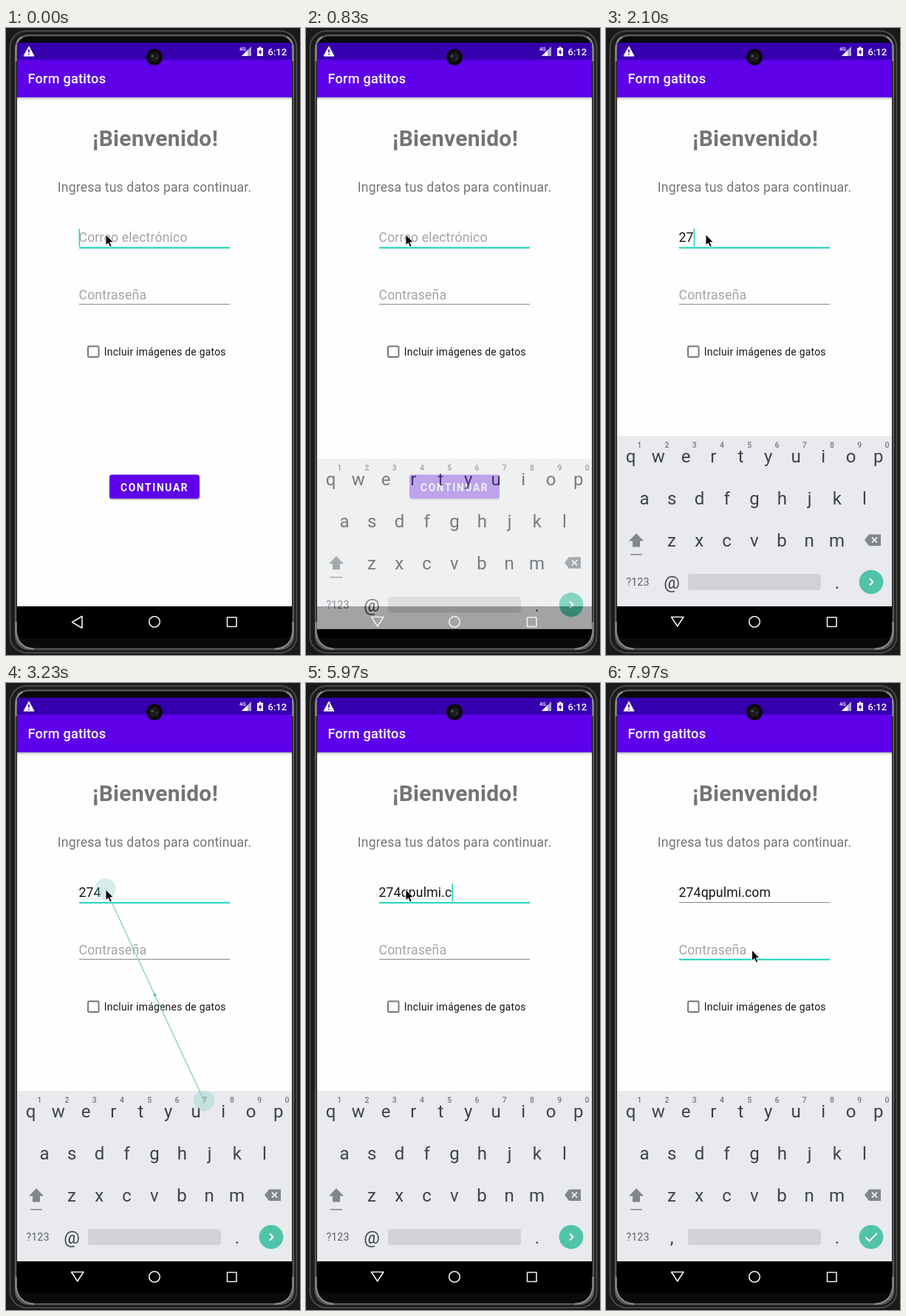
Recreate the animation shown at these times as an HTML page. Size 398 by 850 pixels, loop 8000 ms.

```html
<!DOCTYPE html>
<html lang="es">
<head>
<meta charset="utf-8">
<title>Form gatitos</title>
<style>
  html, body { margin: 0; width: 100%; height: 100%; overflow: hidden; background: #1a1a1a; }
  svg { display: block; width: 398px; height: 850px; }
  text { font-family: Roboto, sans-serif; white-space: pre; }
  .mid { text-anchor: middle; }
  .hint { font-size: 17.6px; letter-spacing: .18px; fill: #a3a3a3; }
  .typed { font-size: 17.6px; letter-spacing: .16px; fill: #141414; }
  .key { font-size: 24px; fill: #3f4346; text-anchor: middle; }
  .digit { font-size: 10.5px; font-weight: 500; fill: #74797d; text-anchor: middle; }
  .nav { fill: none; stroke: #f0f0f0; stroke-width: 1.6; stroke-linejoin: round; }
</style>
</head>
<body>
<svg viewBox="0 0 398 850">
  <defs>
    <clipPath id="screen"><path d="M15 20H387V815Q387 827 375 827H27Q15 827 15 815Z"/></clipPath>
    <linearGradient id="shade" x2="0" y2="1">
      <stop stop-color="#000" stop-opacity=".25"/><stop offset="1" stop-color="#000" stop-opacity="0"/>
    </linearGradient>
  </defs>

  <!-- phone body -->
  <rect width="398" height="850" fill="#1a1a1a"/>
  <rect x="5.5" y="4" width="388" height="843" rx="22" fill="#1c1c1c" stroke="#484848" stroke-width="2"/>
  <rect x="13" y="10" width="376" height="832" rx="18" fill="#0a0a0a" stroke="#585858" stroke-width="2.4"/>
  <path d="M13.500 45V30Q13.500 16 22 12M388.500 45V30Q388.500 16 380 12M13.500 805V818Q15 840 38 842M388.500 805V818Q387 840 364 842"
        fill="none" stroke="#858585" stroke-width="2.600"/>

  <g clip-path="url(#screen)">
    <rect x="15" y="94" width="372" height="690" fill="#fefefe"/>
    <rect x="15" y="784" width="372" height="43"/>
    <rect x="15" y="20" width="372" height="23" fill="#3600af"/>
    <rect x="15" y="43" width="372" height="51" fill="#5e00ea"/>
    <rect x="15" y="94" width="372" height="4" fill="url(#shade)"/>

    <!-- status bar -->
    <path d="M31 25L38 38H24Z" fill="#fff" stroke="#fff" stroke-linejoin="round"/>
    <path d="M31 29V33.600M31 35V36.600" stroke="#3600af" stroke-width="1.600"/>
    <text x="316" y="31" font-size="7" font-weight="500" fill="#fff">4G</text>
    <path d="M319 38L332 25V38Z" fill="#a9a0cf"/>
    <path d="M319 38L327 30V38Z" fill="#fff"/>
    <path d="M340 27H342.500V25.500H345.500V27H348V38H340Z" fill="#fff"/>
    <path d="M344.800 28L341.500 33.400H343.700V37L346.600 31.800H344.600Z" fill="#3600af"/>
    <text x="354.500" y="36.500" font-size="13" font-weight="500" fill="#fff">6:12</text>
    <text x="29.500" y="75.300" font-size="18.200" font-weight="500" letter-spacing=".2" fill="#fff">Form gatitos</text>

    <!-- form -->
    <text class="mid" x="202" y="160" font-size="30" font-weight="700" letter-spacing=".3" fill="#747474">¡Bienvenido!</text>
    <text class="mid" x="201" y="222" font-size="17.600" letter-spacing=".18" fill="#757575">Ingresa tus datos para continuar.</text>
    <text class="hint" id="emailHint" x="98.500" y="290">Correo electrónico</text>
    <text class="typed" id="email" x="98.500" y="290"></text>
    <text class="hint" x="98.500" y="367.500">Contraseña</text>
    <rect id="emailLine" x="99" width="204"/>
    <rect id="passLine" x="99" width="204"/>
    <rect id="caret" width="1.700" height="24" fill="#30d6c2"/>
    <rect x="111" y="431.500" width="14.500" height="14.500" rx="1.800" fill="none" stroke="#757575" stroke-width="1.900"/>
    <text x="132.800" y="444" font-size="13.900" letter-spacing=".25" fill="#141414">Incluir imágenes de gatos</text>
    <rect x="140" y="607.500" width="122" height="32.500" rx="4" fill="#000" opacity=".22"/>
    <rect x="140" y="605.500" width="122" height="32.500" rx="3.500" fill="#5e00ea"/>
    <text x="155" y="627.700" font-size="13.800" font-weight="700" letter-spacing="1.650" fill="#fff">CONTINUAR</text>

    <!-- keyboard -->
    <g id="keyboard">
      <rect x="15" y="553" width="372" height="231" fill="#e8eaed"/>
      <g id="keys"></g>
      <path d="M41 685L51 695.500H46V703.500H36V695.500H31Z" fill="#80868b"/>
      <rect x="33" y="713" width="16" height="1.500" fill="#80868b"/>
      <path d="M350 694L356 686.500H372V702H356Z" fill="#80868b"/>
      <path d="M360 690.500L367 697.500M367 690.500L360 697.500" stroke="#e8eaed" stroke-width="1.800"/>
      <text class="mid" x="43" y="756" font-size="14.300" fill="#5f6368">?123</text>
      <text class="key" id="symbol" x="89" y="760">@</text>
      <rect x="111" y="740" width="180" height="22" rx="4" fill="#d0d2d5"/>
      <text class="key" x="313" y="760">.</text>
      <circle cx="359" cy="751" r="16.300" fill="#50c3a8"/>
      <path id="action" fill="none" stroke="#fff" stroke-width="2"/>
    </g>

    <!-- navigation -->
    <path class="nav" id="back"/>
    <circle class="nav" cx="201" cy="805" r="7.300"/>
    <rect class="nav" x="299.500" y="799" width="12.500" height="12.500"/>
  </g>

  <!-- camera -->
  <circle cx="201" cy="39.500" r="11" fill="#0b0b0b"/>
  <circle cx="201" cy="39.500" r="6.500" fill="#1c1c1c"/>
  <circle cx="198" cy="38" r="1.500" fill="#5c5c5c"/>
  <circle cx="204" cy="41" r="1.200" fill="#444"/>

  <!-- two-finger overlay -->
  <g id="pinch">
    <path d="M135 280L268 566" stroke="#7accb4" stroke-width="1.200"/>
    <circle cx="201.500" cy="423" r="2" fill="#62c2a6"/>
    <g fill="#80cbc4" opacity=".32">
      <circle cx="134.500" cy="279" r="14"/><circle cx="268" cy="566.500" r="14"/>
    </g>
  </g>
  <path id="mouse" d="M0 0V14.500L3.400 11.500L5.700 17L8.200 16L5.900 10.600H10.300Z" fill="#000" stroke="#fff" stroke-width=".9"/>
</svg>
<script>
const LOOP = 8000, TEAL = '#30d6c2', IDLE = '#868690';
const EMAIL = '274qpulmi.com';
const KEY_TIMES = [1850, 2080, 2300, 3500, 3800, 4150, 4400, 4600, 4800, 5300, 5700, 6050, 6250];
const KEYBOARD_IN = 700, PASSWORD_CLICK = 7450, LAYOUT_SWAP = 7620;
const PINCH = [2850, 3450];

const $ = id => document.getElementById(id);
const clamp = v => Math.max(0, Math.min(1, v));
const set = (id, attrs) => {
  for (const name in attrs) $(id).setAttribute(name, attrs[name]);
};
const show = (id, on) => set(id, { visibility: on ? 'visible' : 'hidden' });

function buildKeys() {
  const rows = [['qwertyuiop', 33.5, 589], ['asdfghjkl', 52, 646], ['zxcvbnm', 89, 703]];
  let out = '';
  rows.forEach(([letters, left, y], row) => [...letters].forEach((letter, i) => {
    const x = left + i * 37.25;
    out += `<text class="key" x="${x}" y="${y}">${letter}</text>`;
    if (!row) out += `<text class="digit" x="${x + 11.7}" y="569">${(i + 1) % 10}</text>`;
  }));
  $('keys').innerHTML = out;
}

function underline(id, bottom, focused) {
  const height = focused ? 2.2 : 1;
  set(id, { y: bottom - height, height, fill: focused ? TEAL : IDLE });
}

function draw(t) {
  const typed = KEY_TIMES.filter(k => k <= t).length;
  const onPassword = t >= PASSWORD_CLICK;
  $('email').textContent = EMAIL.slice(0, typed);
  show('emailHint', !typed);
  underline('emailLine', onPassword ? 298 : 299, !onPassword);
  underline('passLine', onPassword ? 376 : 375, onPassword);

  // The caret restarts its blink at every key press or focus change.
  const blinkStart = onPassword ? PASSWORD_CLICK : typed ? KEY_TIMES[typed - 1] : -100;
  const textWidth = typed && !onPassword ? $('email').getComputedTextLength() : 0;
  set('caret', { x: 98.5 + textWidth, y: onPassword ? 349 : 272 });
  show('caret', (t - blinkStart) % 1000 < 500);

  const p = clamp((t - KEYBOARD_IN) / 300);
  set('keyboard', {
    transform: `translate(0 ${230 * (1 - p) ** 3.5})`,
    opacity: Math.min(1, p * 1.6)
  });
  set('back', { d: p > 0 ? 'M88.500 798.500H105L96.700 811Z' : 'M89.500 805.500L103 797.500V813.500Z' });

  const swapped = t >= LAYOUT_SWAP;
  $('symbol').textContent = swapped ? ',' : '@';
  set('action', { d: swapped ? 'M351.500 751.500L356.500 756.500L367 746' : 'M357 746.500L361.500 751L357 755.500' });

  show('pinch', t >= PINCH[0] && t < PINCH[1]);
  const m = clamp((t - 6900) / 450), move = m * m * (3 - 2 * m);
  set('mouse', { transform: `translate(${135 + 62.5 * move} ${280 + 82 * move})` });
}

function tick() {
  draw(performance.now() % LOOP);
  requestAnimationFrame(tick);
}

buildKeys();
tick();
</script>
</body>
</html>
```
